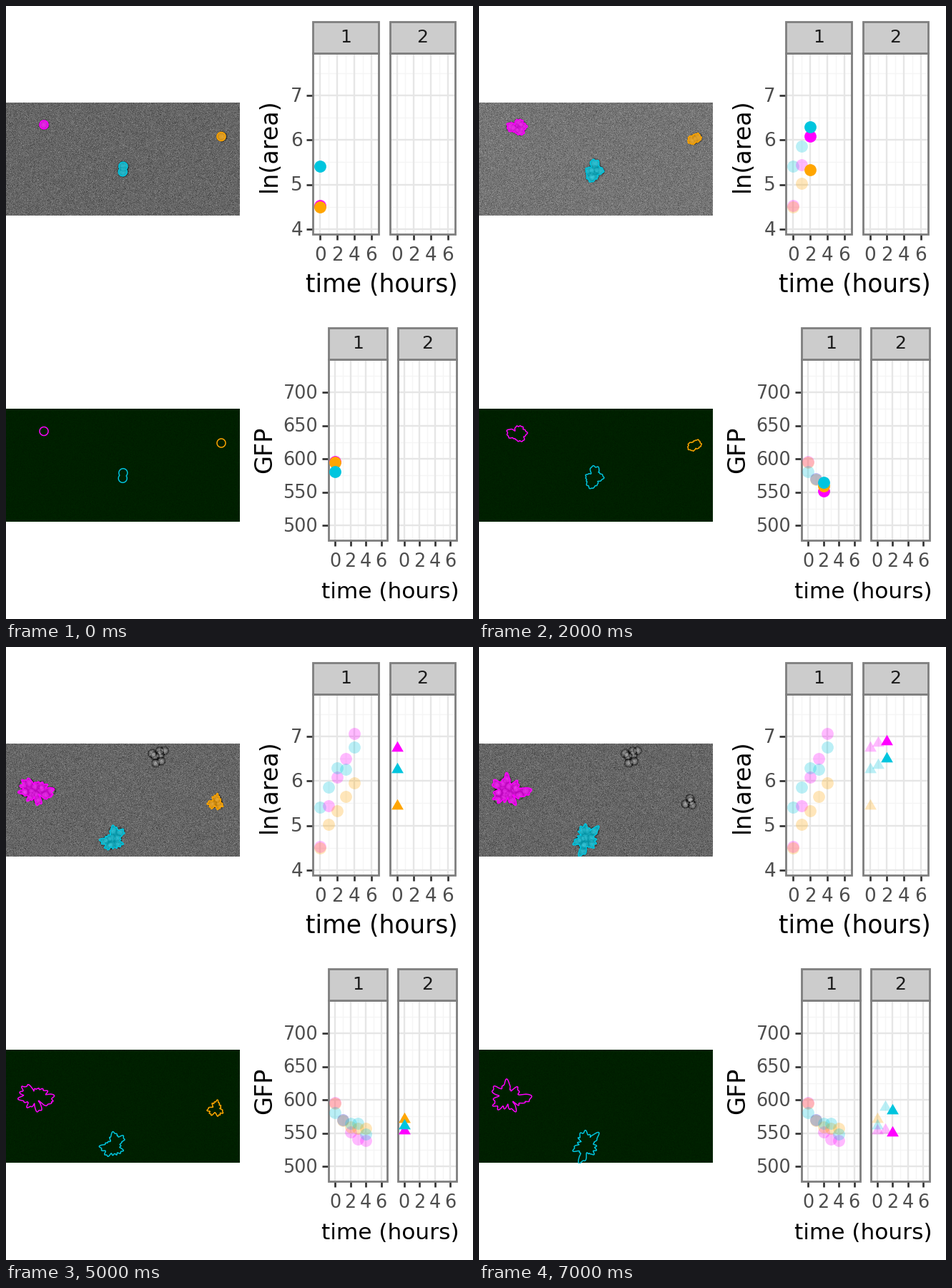
These frames come from a looping animation (653x857 px, 8000 ms). A matplotlib script:

```python
import numpy as np
import matplotlib.pyplot as plt
from matplotlib.animation import FuncAnimation
from matplotlib.patches import Polygon, Rectangle

W, H, DPI = 653, 857, 128
PX = 72 / DPI  # points per pixel
IMG_W, IMG_H, GRAY_TOP, GREEN_TOP = 326.5, 158, 135, 563.5
HOURS, SWITCH = 8, 5  # the second panel begins at SWITCH
MAGENTA, ORANGE, CYAN = "#ff00ff", "#ffa500", "#00c5de"

# Plotted values for each hour
ln_area = {
    MAGENTA: [4.53, 5.45, 6.08, 6.505, 7.06, 6.745, 6.845, 6.89],
    ORANGE: [4.49, 5.03, 5.335, 5.655, 5.95, 5.445],
    CYAN: [5.415, 5.86, 6.29, 6.265, 6.76, 6.26, 6.35, 6.505],
}
fluorescence = {
    MAGENTA: [596, 569.5, 551.5, 541, 538.5, 554, 555, 550.5],
    ORANGE: [595, 568.5, 559, 557, 556.5, 571.5],
    CYAN: [580.5, 569.5, 564.5, 565, 548.5, 561, 589, 584],
}


class Colony:
    """Cells packed in a spiral; their number and spread follow the measured area.

    Places are complex numbers, x + y j, in stage pixels.
    """

    def __init__(self, seed, start, end, late, stretch, tilt, values):
        self.seed, self.start, self.end, self.late = seed, start, end, late
        self.stretch, self.tilt, self.values = stretch ** 0.5, tilt, values

    def center(self, i):
        return self.late if i >= SWITCH else self.start + (self.end - self.start) * i / 4

    def cells(self, i):
        """Cell places about the center, and their radius."""
        late = i >= SWITCH
        size = np.exp(self.values[min(i, len(self.values) - 1)])
        radius, room, spread = (5.2, 60, 1.2) if late else (6, 95, 0.97)
        n = max(1, round(size / room))
        k = np.arange(n)
        z = np.sqrt((k + 0.5) / n) * np.exp(2.4j * k)
        rng = np.random.default_rng(self.seed)
        z = z + 0.1 * (rng.normal(size=(n, 2)) @ [1, 1j])
        z = (z - z.mean()) * (spread * np.sqrt(size / np.pi) - radius / 2)
        z = z.real * self.stretch + 1j * z.imag / self.stretch
        return z * np.exp(1j * self.tilt), radius

    def outline(self, i):
        z, radius = self.cells(i)
        angle = np.linspace(0, 2 * np.pi, 180, endpoint=False)
        ray = np.exp(1j * angle)
        w = z[:, None] * ray.conj()
        chord = np.sqrt(np.maximum(radius ** 2 - w.imag ** 2, 0))
        reach = np.where(chord > 0, w.real + chord, 0).max(axis=0)
        rough = 0.03 * min(i, 4)
        wave = np.sin(7 * angle + i) + 0.8 * np.sin(16 * angle + self.seed)
        edge = self.center(i) + np.maximum(reach, 2) * (1 + rough * wave) * ray
        return np.column_stack([edge.real, edge.imag])


colonies = {
    MAGENTA: Colony(3, 53 + 166j, 55 + 173j, 41 + 201j, 1.4, 0.15, ln_area[MAGENTA]),
    ORANGE: Colony(5, 301 + 182.5j, 301.5 + 189j, 293.5 + 217j, 1.5, 0, ln_area[ORANGE]),
    CYAN: Colony(8, 163.5 + 228j, 157 + 235j, 149 + 269j, 1.5, -1.1, ln_area[CYAN]),
}
stray = Colony(2, 219 + 110j, 219 + 138j, 212 + 152j, 0.85, 0, [4.5] * SWITCH + [6.1])

X, Y = np.meshgrid(np.arange(int(IMG_W)) + 0.5, np.arange(IMG_H) + GRAY_TOP + 0.5)
grid = X + 1j * Y


def micrographs(i):
    rng = np.random.default_rng(i + 1)
    gray = (117 if i in (1, 2) else 102) + rng.normal(0, 13, X.shape)
    for colony in [stray, *colonies.values()]:
        z, radius = colony.cells(i)
        for place in colony.center(i) + z:
            q = abs(grid - place) / radius
            gray += 55 * np.exp(-(q / 0.6) ** 2) - 48 * np.exp(-((q - 1.05) / 0.2) ** 2)
    bright = np.repeat(np.clip(gray, 20, 215)[..., None], 3, axis=2)
    green = np.zeros_like(bright)
    green[..., 1] = 32 + rng.normal(0, 2, X.shape)
    return bright.astype(np.uint8), green.astype(np.uint8)


fig = plt.figure(figsize=(W / DPI, H / DPI), dpi=DPI, facecolor="white")
ax = fig.add_axes([0, 0, 1, 1])
ax.axis("off")


def line(x, y, color, width, z):
    ax.plot(x, y, color=color, lw=width * PX, solid_capstyle="butt", zorder=z)


def label(x, y, text, size, color="black", **kw):
    ax.text(x, y, text, fontsize=size * PX, color=color, family="DejaVu Sans",
            **{"ha": "center", "va": "baseline", **kw})


def box(x0, y0, x1, y1, fill):
    ax.add_patch(Rectangle((x0, y0), x1 - x0, y1 - y0, fc=fill, ec="#7f7f7f",
                           lw=2.8 * PX, zorder=4))


class Chart:
    """Two panels side by side with a shared vertical scale."""

    def __init__(self, top, left, width, step, zero, hour, y_of, majors, minors, text):
        self.left, self.step, self.zero, self.hour = left, step, zero, hour
        self.y_of = y_of
        bottom, split = top + 296.5, top + 43.5
        for k in range(2):
            x0 = left + k * step
            x1 = x0 + width
            for h in range(7):
                x = self.x_of(k, h)
                if h % 2:
                    line([x, x], [split, bottom], "#f5f5f5", 1.3, 1)
                    continue
                line([x, x], [split, bottom], "#e6e6e6", 2.4, 2)
                line([x, x], [bottom, bottom + 8], "#333333", 2.7, 3)
                label(x, bottom + 27.6 + 0.364 * text, h, text, "#4d4d4d")
            for v in minors:
                line([x0, x1], [y_of(v)] * 2, "#f5f5f5", 1.3, 1)
            for v in majors:
                line([x0, x1], [y_of(v)] * 2, "#e6e6e6", 2.4, 2)
            box(x0, split, x1, bottom, "none")
            box(x0, top, x1, split, "#cccccc")
            label((x0 + x1) / 2, top + 29, k + 1, 25, "#1a1a1a", zorder=6)
        for v in majors:
            line([left - 9, left], [y_of(v)] * 2, "#333333", 2.7, 3)
            label(left - 14.3, y_of(v) + 0.364 * text - 0.7, v, text, "#4d4d4d", ha="right")

    def x_of(self, panel, h):
        return self.zero + panel * self.step + self.hour * h

    def points(self, series):
        """Early hours are dots in the first panel, later ones triangles in the second."""
        made = []
        for t in range(HOURS):
            panel, h = divmod(t, SWITCH)
            marker, size = ((3, 0, 0), 19.4) if panel else ("o", 16.8)
            for color, values in series.items():
                if t < len(values):
                    dot, = ax.plot(self.x_of(panel, h), self.y_of(values[t]), marker=marker,
                                   color=color, ms=size * PX, mew=0, zorder=5)
                    made.append((t, dot))
        return made


area = Chart(22, 429.3, 91.6, 107.2, 439.3, 11.9, lambda v: 312 - 62.4 * (v - 4),
             np.arange(4, 8), np.arange(4.5, 8), 26.3)
gfp = Chart(450.3, 450.6, 82.7, 96.9, 460, 10.75, lambda v: 726 - 0.93 * (v - 500),
            range(500, 701, 50), range(525, 726, 50), 25.5)

label(525.5, 400, "time (hours)", 34.5)
label(537.5, 828.5, "time (hours)", 31.2)
upright = dict(rotation=90, rotation_mode="anchor")
label(378, 194.5, "ln(area)", 33.3, **upright)
label(371.5, 620.5, "GFP", 33.5, **upright)

points = area.points(ln_area) + gfp.points(fluorescence)
scenes = [micrographs(i) for i in range(HOURS)]
images, shapes = [], []
for k, top in enumerate((GRAY_TOP, GREEN_TOP)):
    images.append(ax.imshow(scenes[0][k], extent=(0, IMG_W, top + IMG_H, top),
                            aspect="auto", interpolation="nearest", zorder=1))
    for color, colony in colonies.items():
        shape = Polygon(colony.outline(0), ec=color, lw=1.5 * PX, joinstyle="round",
                        fc="none" if k else (color, 0.72), zorder=2)
        ax.add_patch(shape)
        shape.set_clip_path(Rectangle((0, top), IMG_W, IMG_H, transform=ax.transData))
        shapes.append((shape, colony, (0, top - GRAY_TOP)))
ax.set_xlim(0, W)
ax.set_ylim(H, 0)


def update(i):
    for image, data in zip(images, scenes[i]):
        image.set_data(data)
    for shape, colony, offset in shapes:
        shape.set_visible(i < len(colony.values))
        shape.set_xy(colony.outline(i) + offset)
    for t, dot in points:
        dot.set_visible(t <= i)
        dot.set_alpha(1 if t == i else 0.27)


anim = FuncAnimation(fig, update, frames=HOURS, interval=1000, repeat=True, repeat_delay=0)
plt.show()
```
